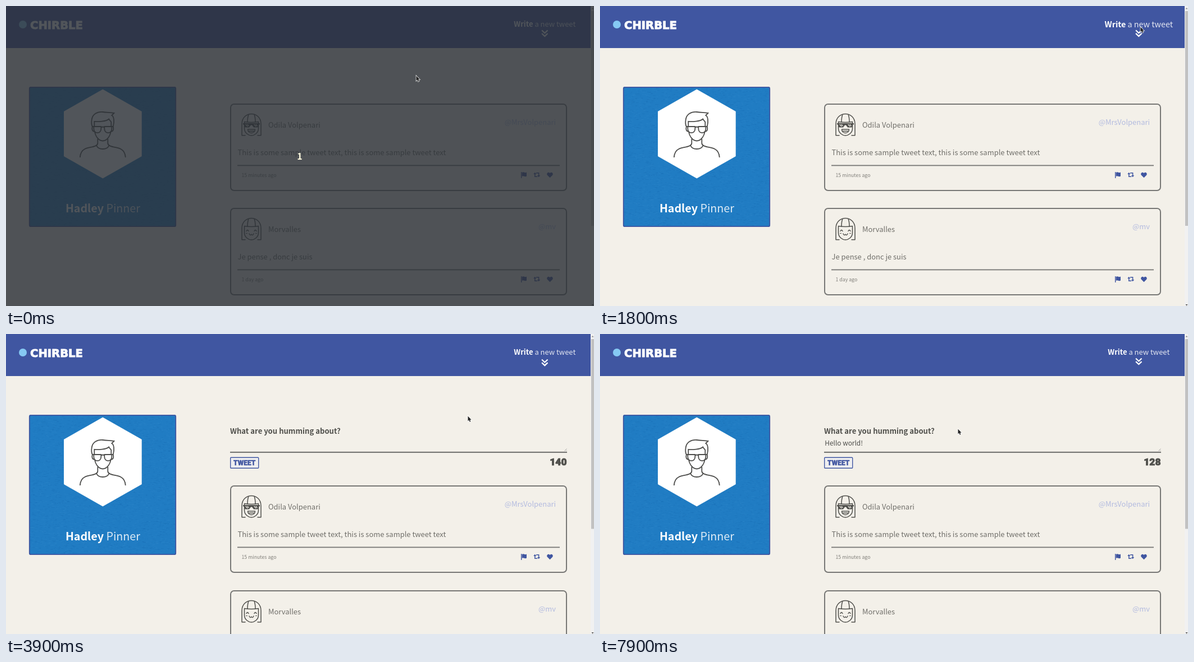
An HTML page with a canvas for the animation above (8000 ms loop, 1047 by 535 pixels).

```html
<!DOCTYPE html>
<html lang="en">
<head>
<meta charset="utf-8">
<title>Timeline</title>
<style>
  html, body { margin: 0; width: 100%; height: 100%; overflow: hidden; background: #f3f0e9; }
  canvas { display: block; }
</style>
</head>
<body>
<canvas id="stage" width="1047" height="535"></canvas>
<script>
const W = 1047, H = 535, LOOP = 8000, STEP = 100;
const ctx = document.getElementById('stage').getContext('2d');
const SANS = '"Noto Sans CJK JP", "Noto Sans CJK SC", "Open Sans", sans-serif';
const WIDE = '"DejaVu Sans", sans-serif';
const SLAB = 'Roboto, "Liberation Sans", sans-serif';
const NAVY = '#4056a1', PAPER = '#f3f0e9', INK = '#50504c', SOFT = '#706f6a', GREY = '#777775';

const clamp = v => Math.max(0, Math.min(1, v));
const mix = (a, b, p) => a + (b - a) * p;
const ramp = (t, from, to) => clamp((t - from) / (to - from));
const swing = p => 0.5 - Math.cos(p * Math.PI) / 2;

function text(str, x, y, size, color, { weight = 300, align = 'left', family = SANS, edge = 0 } = {}) {
  ctx.font = `${weight} ${size}px ${family}`;
  ctx.textAlign = align;
  ctx.fillStyle = color;
  ctx.fillText(str, x, y);
  if (edge) {
    ctx.strokeStyle = color;
    ctx.lineWidth = edge;
    ctx.strokeText(str, x, y);
  }
  return ctx.measureText(str).width;
}

function rect(x, y, w, h, color) {
  ctx.fillStyle = color;
  ctx.fillRect(x, y, w, h);
}

function frame(x, y, w, h, r, color, width) {
  ctx.beginPath();
  ctx.roundRect(x, y, w, h, r);
  ctx.strokeStyle = color;
  ctx.lineWidth = width;
  ctx.stroke();
}

function line(d, color, width) {
  ctx.strokeStyle = color;
  ctx.lineWidth = width;
  ctx.stroke(new Path2D(d));
}

function fill(d, color) {
  ctx.fillStyle = color;
  ctx.fill(new Path2D(d));
}

function at(x, y, draw) {
  ctx.save();
  ctx.translate(x, y);
  draw();
  ctx.restore();
}

// White bold and thin text runs side by side, centred on x.
function centredPair(bold, thin, x, y, size) {
  ctx.font = `700 ${size}px ${SANS}`;
  const a = ctx.measureText(bold + ' ').width;
  ctx.font = `300 ${size}px ${SANS}`;
  const left = x - (a + ctx.measureText(thin).width) / 2;
  text(bold, left, y, size, '#fff', { weight: 700 });
  text(thin, left + a, y, size, 'rgba(255,255,255,.85)');
}

// Woven blue cloth, drawn once.
const cloth = document.createElement('canvas');
cloth.width = 262;
cloth.height = 250;
(() => {
  const c = cloth.getContext('2d');
  let seed = 7;
  const rnd = () => (seed = seed * 16807 % 2147483647) / 2147483647;
  c.fillStyle = '#207cc3';
  c.fillRect(0, 0, 262, 250);
  for (let i = 0; i < 5000; i++) {
    c.fillStyle = rnd() < 0.5 ? 'rgba(10,70,140,.09)' : 'rgba(90,170,225,.07)';
    c.fillRect(Math.floor(rnd() * 262), Math.floor(rnd() * 250), 1 + rnd() * 4, 1);
  }
})();

function header(t) {
  rect(0, 0, 1041, 75, NAVY);
  ctx.beginPath();
  ctx.arc(30, 33, 7, 0, 7);
  ctx.fillStyle = '#86c9f3';
  ctx.fill();
  text('CHIRBLE', 43, 41, 19.6, '#fff', { weight: 700, family: WIDE, edge: 0.9 });

  const hover = ramp(t, 1100, 1300) - ramp(t, 3000, 3200);
  const scale = 1 + 0.105 * hover;
  at(959.3, 32, () => {
    ctx.scale(scale, scale);
    centredPair('Write', 'a new tweet', 0, 5, 12.95);
  });

  const drop = (1 + Math.cos((t - 2550) / 1600 * 2 * Math.PI)) / 2;
  at(959.3, 48.3 + 3.7 * drop * drop, () =>
    line('M-5.2,-5 L0,0 L5.2,-5 M-5.2,.6 L0,5.6 L5.2,.6', '#fff', 2.2));
}

function profile() {
  ctx.save();
  ctx.beginPath();
  ctx.roundRect(41, 144, 262, 250, 3);
  ctx.clip();
  ctx.drawImage(cloth, 41, 144);
  ctx.restore();
  frame(41.8, 144.8, 260.4, 248.4, 3, NAVY, 1.8);
  fill('M172.3,148.5 L241.7,188 V268 L172.3,307.5 L103,268 V188 Z', '#fff');
  at(172.3, 188, () => line(
    // hair
    'M-18.5,27 C-21,22 -20,17 -19.5,14 C-18,5 -10,0 0,1 C8,2 14,2 20,3 C18,5 17,6 16,7 C20,9 21,18 18.5,27' +
    'M-15,26 V18 C-8,18.5 6,18 11,13.5 C12,16 14,17 15,19 V26' +
    // jaw
    'M-18.5,27 C-20,33 -18,36 -14.5,36 M18.5,27 C20,33 18,36 14.5,36' +
    'M-14.5,35 C-13,46 -6,52.5 0,52.5 C6,52.5 13,46 14.5,35' +
    // glasses
    'M-19,27 H-16 M16,27 H19 M-3,29 Q0,26 3,29' +
    'M-16,27 H-3 V31 C-3,40.5 -16,40.5 -16,31 Z M16,27 H3 V31 C3,40.5 16,40.5 16,31 Z' +
    // neck and shoulders
    'M-9,49 V57 C-10,64 -24,63 -32,67 C-38,70 -40,75 -40.5,82' +
    'M9,49 V57 C10,64 24,63 32,67 C38,70 40,75 40.5,82' +
    'M-11,61 C-8,69 8,69 11,61', '#4d4d4b', 1.8));
  centredPair('Hadley', 'Pinner', 172.4, 368, 19.7);
}

function girl(x, y, cool) {
  at(x, y, () => {
    ctx.lineCap = ctx.lineJoin = 'round';
    line('M-11,19.3 H-17 V-1 C-17,-25 17,-25 17,-1 V19.3 H11' +
      'M-12.5,-5 V7 C-12.5,15 -5,19.5 0,19.5 C5,19.5 12.5,15 12.5,7 V-5' +
      'M-12.5,-5 C-6,-4 6,-4 12.5,-5 M-5,-18 C-7,-13 -7,-8 -7,-5 M5,-18 C7,-13 7,-8 7,-5', INK, 1.5);
    if (cool) {
      fill('M-15,-2.5 H15 V0 H13 V2.5 L11,5 H4 L1,1 H-1 L-4,5 H-11 L-13,2.5 V0 H-15 Z', INK);
      line('M-10,0 L-7,3 M-7,0 L-5,2 M5,0 L8,3 M8,0 L10,2', PAPER, 1.2);
      line('M-6.5,8.5 H6.5 C6.5,17 -6.5,17 -6.5,8.5 Z M-5.5,11.8 H5.5', INK, 1.5);
    } else {
      line('M-9,4 Q-7,0 -5,4 M5,4 Q7,0 9,4 M-4,8.5 Q-2,13 0,9.5 Q2,13 4,8.5', INK, 1.4);
      line('M-9.5,8 H-7.5 M7.5,8 H9.5', INK, 1);
    }
    ctx.lineCap = 'butt';
    ctx.lineJoin = 'miter';
  });
}

function icons(y) {
  at(922, y, () => {
    rect(-5, -5, 1.4, 11, NAVY);
    fill('M-3.2,-4 Q-1,-5.5 1,-4.2 Q3,-3.2 5,-4.5 V2.5 Q3,3.8 1,2.8 Q-1,1.6 -3.2,2.8 Z', NAVY);
  });
  at(945.2, y, () => {
    line('M-3.4,-2 V3.2 H1.2 M3.4,2 V-3.2 H-1.2', NAVY, 1.5);
    fill('M-6,-1 L-3.4,-4.2 L-.8,-1 Z M6,1 L3.4,4.2 L.8,1 Z', NAVY);
  });
  at(968.5, y, () =>
    fill('M0,5.2 L-4.5,.8 C-7,-2 -3,-6.5 0,-2.8 C3,-6.5 7,-2 4.5,.8 Z', NAVY));
}

function card(y, post) {
  at(0, y, () => {
    frame(400, 1, 598, 154, 6, GREY, 2);
    girl(437, 37.5, post.cool);
    text(post.name, 467, 43, 12.95, SOFT);
    text(post.handle, 979, 38, 12.95, '#b3bbdf', { align: 'right' });
    text(post.body, 412.5, 92, 12.95, SOFT);
    rect(412, 109.5, 574, 1.8, GREY);
    text(post.age, 419.5, 131, 8.75, '#807f7a');
    icons(127);
  });
}

const posts = [
  { name: 'Odila Volpenari', handle: '@MrsVolpenari', age: '15 minutes ago', cool: true,
    body: 'This is some sample tweet text, this is some sample tweet text' },
  { name: 'Morvalles', handle: '@mv', age: '1 day ago', cool: false, body: 'Je pense , donc je suis' }
];

const MESSAGE = 'Hello world!';
const keyTimes = [5300, 5500, 5700, 5900, 6000, 6100, 6300, 6400, 6500, 6600, 6800, 7200];
const FOCUS = 2400;

function form(t, height) {
  if (!height) return;
  ctx.save();
  ctx.beginPath();
  ctx.rect(390, 144, 620, height);
  ctx.clip();
  text('What are you humming about?', 399, 177.5, 13.1, INK, { weight: 700 });

  const count = keyTimes.filter(k => k <= t).length;
  const width = text(MESSAGE.slice(0, count), 400.3, 199, 11.9, '#4c4c49');
  const last = count ? keyTimes[count - 1] : FOCUS;
  if (t >= FOCUS && Math.floor((t - last) / 500) % 2 === 0) {
    rect(Math.floor(400.3 + width), 185, 1, 18, '#333');
  }

  rect(399, 209.8, 600, 2.2, GREY);
  line('M994.5,208.5 L998.5,204.5 M997,208.5 L998.5,207', '#999', 0.8);
  rect(399, 219.5, 51.5, 20.5, '#efeff0');
  frame(399.7, 220.2, 50, 19, 1, NAVY, 1.4);
  text('TWEET', 424.7, 234, 12, NAVY, { weight: 900, align: 'center', family: SLAB, edge: 0.4 });
  text(String(140 - count), 998.5, 233.5, 17.4, INK, { weight: 900, align: 'right', family: SLAB, edge: 0.9 });
  ctx.restore();
}

function scrollbar(open) {
  rect(1041, 0, 6, H, '#f1f1f1');
  rect(1042, 9, 5, mix(383, 338.5, open), '#c1c1c1');
  fill('M1042.5,5.5 L1044.5,3 L1046.5,5.5 Z', '#8a8a8a');
  fill('M1042.5,532 L1044.5,534.5 L1046.5,532 Z', '#505050');
}

// Pointer moves: start, end, then the place reached.
const START = [730, 124];
const moves = [
  [400, 1300, 962, 37],
  [2900, 3500, 822, 146],
  [7400, 7900, 637, 169]
];

function pointer(t) {
  let [x, y] = START;
  for (const [from, to, mx, my] of moves) {
    const p = swing(ramp(t, from, to));
    x = mix(x, mx, p);
    y = mix(y, my, p);
  }
  at(x, y, () => {
    const d = 'M.5,.5 V9.3 L2.4,7.6 L3.8,10.8 L5.4,10.1 L4,7 H6.6 Z';
    line(d, 'rgba(255,255,255,.85)', 1.6);
    fill(d, '#222');
  });
}

function draw(t) {
  const open = swing(ramp(t, 2000, 2400));
  const shift = 96.4 * open;
  rect(0, 0, W, H, PAPER);
  header(t);
  profile();
  form(t, shift);
  posts.forEach((post, i) => card(Math.round(174 + shift + i * 186.4), post));
  scrollbar(open);
  if (t < STEP) {
    rect(0, 0, W, H, 'rgba(43,48,54,.82)');
    text('1', 523, 273.5, 16, '#fffbe0', { weight: 700, align: 'center' });
  }
  pointer(t);
}

const origin = performance.now();
function tick() {
  const t = (performance.now() - origin) % LOOP;
  draw(Math.floor(t / STEP) * STEP);
  requestAnimationFrame(tick);
}
tick();
</script>
</body>
</html>
```
